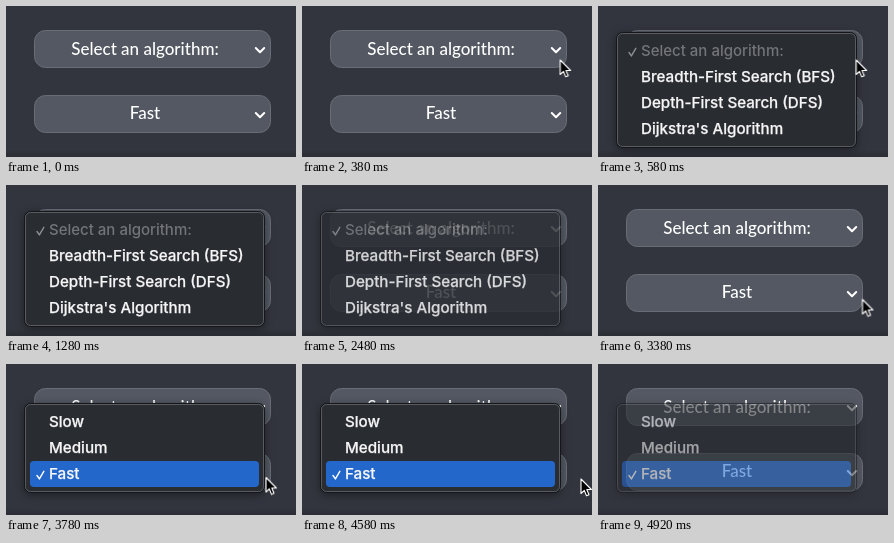
These frames come from a looping animation (290x151 px, 5.68 s). An HTML page:

```html
<!DOCTYPE html>
<html lang="en">
<head>
<meta charset="utf-8">
<title>Dropdown menus</title>
<style>
  html, body { margin: 0; width: 100%; height: 100%; overflow: hidden; background: #33353e; }
  svg { display: block; width: 100%; height: 100%; }

  .field rect { fill: #535862; stroke: #696d76; }
  .field text { font: 500 17px Lato, sans-serif; fill: #fff; text-anchor: middle; }
  .chevron { fill: none; stroke: #fff; stroke-width: 2; stroke-linecap: round; stroke-linejoin: round; }

  .menu text { font: 500 15.15px Inter, sans-serif; fill: #f6f6f7; stroke: #f6f6f7; stroke-width: .25; }
  .menu .muted { font-size: 15px; fill: #737579; stroke: none; }
  .panel { fill: #292c31; stroke: #15161a; filter: drop-shadow(0 2px 4px rgba(0, 0, 0, .4)); }
  .rim { fill: none; stroke: #595b60; }
  .highlight { fill: #2367cb; }
  .check { fill: none; stroke: #fff; stroke-width: 1.4; stroke-linecap: round; stroke-linejoin: round; }
  .check.dim { stroke: #8d8f93; }

  .menu, .cursor { animation: 5680ms step-end infinite; }
  #algorithms { animation-name: algorithms; }
  #speeds { animation-name: speeds; }
  .cursor { animation-name: pointer; fill: #000; stroke: #fff; stroke-width: 1.1; stroke-linejoin: round; }

  @keyframes algorithms {
    0% { opacity: 0; }
    10.211% { opacity: 1; }
    43.661% { opacity: .82; }
    47.183% { opacity: .3; }
    48.943%, 100% { opacity: 0; }
  }
  @keyframes speeds {
    0% { opacity: 0; }
    66.549% { opacity: 1; }
    86.619%, 100% { opacity: .58; }
  }
  @keyframes pointer {
    0% { transform: translate(310px, 54px); }
    /* in to the first field */
    1.408% { transform: translate(281px, 54px); }
    3.169% { transform: translate(267px, 54px); }
    4.929% { transform: translate(260px, 54px); }
    6.69% { transform: translate(258.2px, 54px); }
    /* and out again */
    17.253% { transform: translate(262px, 56px); }
    19.014% { transform: translate(271px, 60px); }
    20.774% { transform: translate(283px, 63px); }
    22.535% { transform: translate(310px, 66px); }
    /* in to the second field */
    54.225% { transform: translate(274.5px, 115.5px); }
    59.507% { transform: translate(264.5px, 114.5px); }
    61.267% { transform: translate(262.5px, 114px); }
    63.028% { transform: translate(261px, 113.5px); }
    64.788% { transform: translate(260px, 113.5px); }
    69.19% { transform: translate(262px, 114.5px); }
    /* and out again */
    78.873% { transform: translate(267px, 115px); }
    80.633% { transform: translate(279px, 115px); }
    82.394%, 100% { transform: translate(310px, 115px); }
  }
</style>
</head>
<body>
<svg viewBox="0 0 290 151">
  <defs>
    <linearGradient id="edge" x2="0" y2="1">
      <stop stop-color="#2b2d35" stop-opacity="0"/>
      <stop offset="1" stop-color="#2b2d35"/>
    </linearGradient>
    <path id="chevron" class="chevron" d="M249.8 0 l4.2 4.2 l4.2 -4.2"/>
    <path id="check" d="M31 1 l2.4 3.4 l4.4 -7.6"/>
  </defs>

  <rect width="290" height="151" fill="#33353e"/>
  <rect y="144" width="290" height="7" fill="url(#edge)"/>

  <g class="field">
    <rect x="28.5" y="24.5" width="236" height="37" rx="11"/>
    <text x="139" y="49">Select an algorithm:</text>
    <use href="#chevron" y="42"/>
  </g>
  <g class="field">
    <rect x="28.5" y="89.5" width="236" height="37" rx="11"/>
    <text x="139" y="113">Fast</text>
    <use href="#chevron" y="107"/>
  </g>

  <g class="menu" id="algorithms">
    <rect class="panel" x="18.5" y="26.5" width="240" height="115" rx="6"/>
    <rect class="rim" x="19.5" y="27.5" width="238" height="113" rx="5"/>
    <use href="#check" class="check dim" y="45.5"/>
    <text class="muted" x="43" y="50">Select an algorithm:</text>
    <text x="43" y="76">Breadth-First Search (BFS)</text>
    <text x="43" y="102">Depth-First Search (DFS)</text>
    <text x="43" y="128">Dijkstra's Algorithm</text>
  </g>

  <g class="menu" id="speeds">
    <rect class="panel" x="18.5" y="39.5" width="240" height="89" rx="6"/>
    <rect class="rim" x="19.5" y="40.5" width="238" height="87" rx="5"/>
    <rect class="highlight" x="24" y="97" width="229" height="26" rx="4"/>
    <use href="#check" class="check" y="110.5"/>
    <text x="43" y="63">Slow</text>
    <text x="43" y="89">Medium</text>
    <text x="43" y="115">Fast</text>
  </g>

  <path class="cursor" d="M0 0 V14.5 L3.3 11.4 L5.5 16.8 L8 15.8 L5.8 10.5 H10.4 Z"/>
</svg>
</body>
</html>
```
